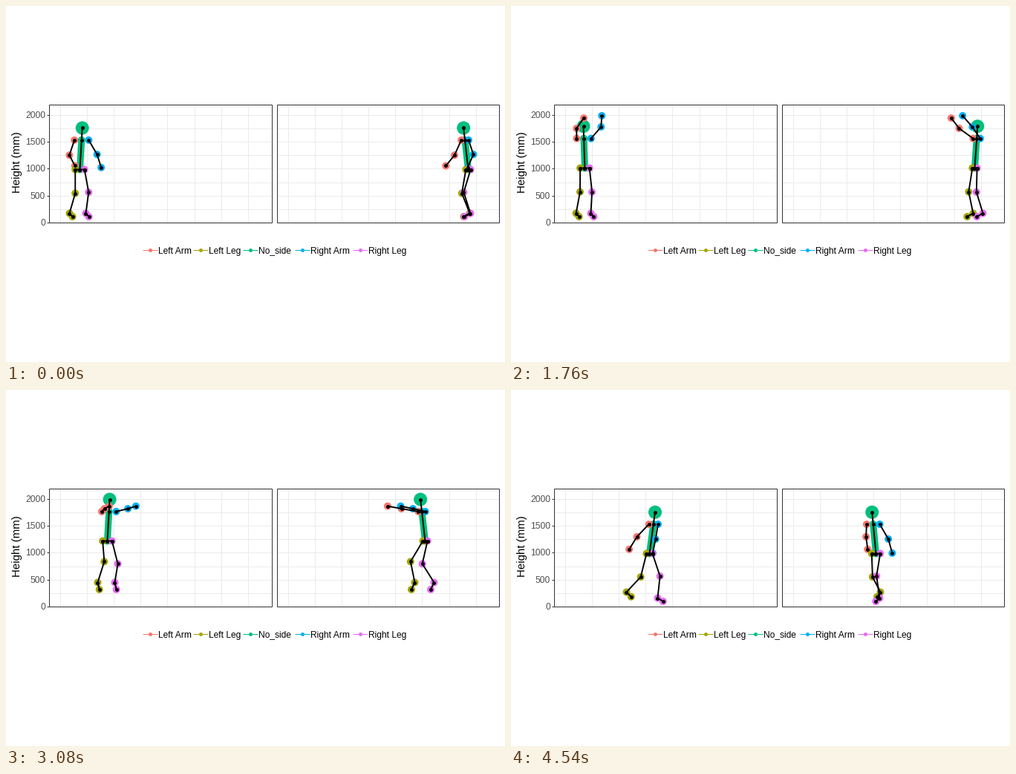
Write a matplotlib script that moves like this. It is 672 px wide and 480 px high and loops after 4.56 s.

```python
import numpy as np
import matplotlib.pyplot as plt
from matplotlib.animation import FuncAnimation
from matplotlib.patches import Rectangle

W, H, DPI = 672, 480, 100
STEP, LOOP = 20, 4560
COUNT = LOOP // STEP
PX = 72 / DPI  # points per pixel

LEFT_ARM, LEFT_LEG, BODY, RIGHT_ARM, RIGHT_LEG = (
    "#F8766D", "#A3A500", "#00BF7D", "#00B0F6", "#E76BF3")
DARK, GRID, LABEL = "#333333", "#EBEBEB", "#4D4D4D"

# Limb lengths in pixels
TRUNK, SKULL, SHOULDER, HIP = 40, 16.5, 10.8, 7
UPPER_ARM, FOREARM, THIGH, SHIN, FOOT = 23.3, 20, 32.5, 30, 9
GROUND = 279

plt.rcParams["font.family"] = "Liberation Sans"


def track(*keys):
    """Monotone cubic curve through (time, value) keys, one row per frame."""
    now = np.arange(COUNT)[:, None] * float(STEP)
    t = np.array([k[0] for k in keys], float)[:, None]
    p = np.array([k[1:] for k in keys], float)
    slope = np.diff(p, axis=0) / np.diff(t, axis=0)
    a, b = slope[:-1], slope[1:]
    same = a * b > 0
    inner = np.where(same, 2 * a * b / np.where(same, a + b, 1), 0)
    m = np.concatenate([slope[:1], inner, slope[-1:]])
    k = np.clip(np.searchsorted(t[:, 0], now[:, 0], "right") - 1,
                0, len(t) - 2)
    h = t[k + 1] - t[k]
    u = (now - t[k]) / h
    return ((1 + 2 * u) * (1 - u) ** 2 * p[k] + u * (1 - u) ** 2 * h * m[k]
            + u * u * (3 - 2 * u) * p[k + 1] + u * u * (u - 1) * h * m[k + 1])


# Space is (front x, side x, y down); angles are in degrees
DOWN = np.array([0, 0, 1.0])
yaw = np.radians(track((0, 27), (3760, 26), (4540, 55)))
across = np.hstack([np.cos(yaw), np.sin(yaw), 0 * yaw])
ahead = np.hstack([np.sin(yaw), -np.cos(yaw), 0 * yaw])

# Stand, stretch up, dip, leap, land in a squat, walk on
base = np.hstack([
    track((0, 99), (980, 98), (2620, 102), (2840, 120), (3080, 136),
          (3760, 158), (4540, 186)),
    track((0, 622), (980, 628), (1760, 624), (2400, 620), (2620, 617),
          (3080, 564), (3760, 518), (4540, 491)),
    track((0, 220), (980, 218), (1760, 218), (2400, 237), (2620, 233),
          (2840, 212), (3040, 202), (3260, 219), (3760, 251), (4360, 221),
          (4540, 220))])
lean = track((0, 5), (980, -4), (1760, -3), (2400, 17), (2620, 20),
             (3080, 5), (3300, 8), (3760, 22), (4400, 6), (4540, 6.5))

# Arm swing: pitch 0 hangs down, 90 points ahead; skew sets the sides apart
upper_pitch = track((0, 6), (980, 125), (1630, 140), (1760, 132),
                    (2380, -75), (2620, 19), (2860, 95), (3080, 100),
                    (3760, 20), (4540, -31))
fore_pitch = track((0, 36), (980, 135), (1630, 146), (1760, 138),
                   (2380, -60), (2620, 25), (2860, 96), (3080, 100),
                   (3760, 22), (4540, -24))
upper_spread = track((0, 30), (1760, 20), (2620, 27), (3080, 17),
                     (3760, 33), (4540, 22))
fore_spread = track((0, 0), (980, -15), (1760, -13), (2620, 6), (4540, 9))
skew = track((0, 8), (980, -3), (1760, -3), (2620, 9), (3080, 0),
             (3760, 54), (4540, -6))

left_ankle = track((0, 85, 624, GROUND), (2620, 89, 620, GROUND),
                   (2850, 100, 608, 268), (3080, 123, 550, 259),
                   (3360, 152, 502, GROUND), (4340, 152, 502, GROUND),
                   (4540, 155, 497, 272))
right_ankle = track((0, 107, 625, GROUND), (500, 106, 636, GROUND),
                    (1760, 107, 635, GROUND), (2620, 108, 630, GROUND),
                    (2850, 124, 617, 269), (3080, 146, 576, 259),
                    (3400, 178, 523, 278), (3780, 178, 523, 278),
                    (4340, 197, 496, 280), (4540, 197, 496, 280))


def aim(side, pitch, spread):
    """Direction of an arm bone; side is -1 for left, 1 for right."""
    p = np.radians(pitch - side * skew)
    s = np.radians(spread + side * skew / 2)
    swing = ahead * np.sin(p) + DOWN * np.cos(p)
    return side * across * np.sin(s) + swing * np.cos(s)


def arm(neck, side):
    shoulder = neck + side * SHOULDER * across
    elbow = shoulder + UPPER_ARM * aim(side, upper_pitch, upper_spread)
    wrist = elbow + FOREARM * aim(side, fore_pitch, fore_spread)
    return [shoulder, elbow, wrist]


def leg(ankle, side):
    """Bend the knee ahead so that the leg spans hip to ankle."""
    hip = base + side * HIP * across
    span = ankle - hip
    d = np.linalg.norm(span, axis=1, keepdims=True)
    axis = span / d
    along = (THIGH ** 2 - SHIN ** 2 + d ** 2) / (2 * d)
    bend = np.sqrt(np.maximum(THIGH ** 2 - along ** 2, 0))
    pole = ahead - axis * np.sum(ahead * axis, axis=1, keepdims=True)
    pole /= np.linalg.norm(pole, axis=1, keepdims=True)
    knee = hip + along * axis + bend * pole
    lift = np.maximum(GROUND - ankle[:, 2:], 0)
    toe = ankle + (FOOT - lift / 5) * ahead + (4.5 + lift / 4) * DOWN
    return [hip, knee, ankle, toe]


def build_body():
    spine = lean * ahead - np.sqrt(TRUNK ** 2 - lean ** 2) * DOWN
    neck = base + spine
    head = neck + spine * SKULL / TRUNK
    parts = [[head, neck, base], arm(neck, -1), arm(neck, 1),
             leg(left_ankle, -1), leg(right_ankle, 1)]
    return np.stack([joint for part in parts for joint in part], axis=1)


POSES = build_body()
HEAD, NECK, BASE, LEFT_HIP, RIGHT_HIP = 0, 1, 2, 9, 13
CHAINS = [[0, 1, 2], [3, 4, 5], [6, 7, 8], [9, 10, 11, 12],
          [13, 14, 15, 16], [LEFT_HIP, BASE, RIGHT_HIP]]
COLORS = ([BODY] * 3 + [LEFT_ARM] * 3 + [RIGHT_ARM] * 3
          + [LEFT_LEG] * 4 + [RIGHT_LEG] * 4)

fig = plt.figure(figsize=(W / DPI, H / DPI), dpi=DPI, facecolor="white")
ax = fig.add_axes([0, 0, 1, 1])
# Whole numbers are pixel centres, nudged so that lines snap onto them
ax.set_xlim(-0.49, W - 0.49)
ax.set_ylim(H - 0.51, -0.51)
ax.axis("off")


def line(xs, ys, color, width=1, z=1):
    return ax.plot(xs, ys, color=color, lw=width * PX, zorder=z,
                   solid_capstyle="butt")[0]


def text(x, y, label, size=12, color="black", **kw):
    ax.text(x, y, label, fontsize=size * PX, color=color, **kw)


def draw_panel(x0, x1, first):
    for i in range(8):
        x = round(first + 36.1 * i)
        line([x, x], [132, 291], GRID)
    for i in range(9):
        y = round(291 - 18.15 * i)
        line([x0, x1], [y, y], GRID)
    ax.add_patch(Rectangle((x0, 132), x1 - x0, 159, fill=False,
                           ec=DARK, lw=PX, zorder=2))


def draw_legend():
    items = [(194, "Left Arm", LEFT_ARM), (262, "Left Leg", LEFT_LEG),
             (329, "No_side", BODY), (399, "Right Arm", RIGHT_ARM),
             (477, "Right Leg", RIGHT_LEG)]
    for x, label, color in items:
        line([x - 10, x + 10], [328, 328], color)
        ax.plot(x, 328, "o", color=color, ms=5 * PX, mew=0)
        text(x + 11, 333, label)


class Figure:
    """One view of the moving body."""

    def __init__(self, view):
        self.view = view
        self.trunk = line([], [], BODY, 9, 3)
        sizes = np.full(len(COLORS), (10 * PX) ** 2)
        sizes[HEAD] = (18 * PX) ** 2
        self.joints = ax.scatter(np.zeros(len(COLORS)), np.zeros(len(COLORS)),
                                 s=sizes, c=COLORS, lw=0, zorder=4)
        self.bones = line([], [], "black", 1.9, 5)
        self.bones.set(marker="o", markersize=5 * PX, markeredgewidth=0)

    def show(self, joints):
        xy = joints[:, [self.view, 2]]
        self.trunk.set_data(xy[[NECK, BASE]].T)
        self.joints.set_offsets(xy)
        gap = [[np.nan, np.nan]]
        path = np.concatenate([np.vstack([xy[c], gap]) for c in CHAINS])
        self.bones.set_data(path.T)


draw_panel(58, 358, 73)
draw_panel(365, 664, 380)
for i in range(5):
    y = round(291 - 36.3 * i)
    line([54.5, 58], [y, y], DARK)
    text(52.5, y + 4.5, str(500 * i), color=LABEL, ha="right")
text(15, 210.5, "Height (mm)", 15, rotation=90, ha="center", va="center")
draw_legend()
views = [Figure(0), Figure(1)]


def update(i):
    for view in views:
        view.show(POSES[i])


anim = FuncAnimation(fig, update, frames=COUNT, init_func=lambda: update(0),
                     interval=STEP, repeat=True, repeat_delay=0, blit=False)
plt.show()
```
